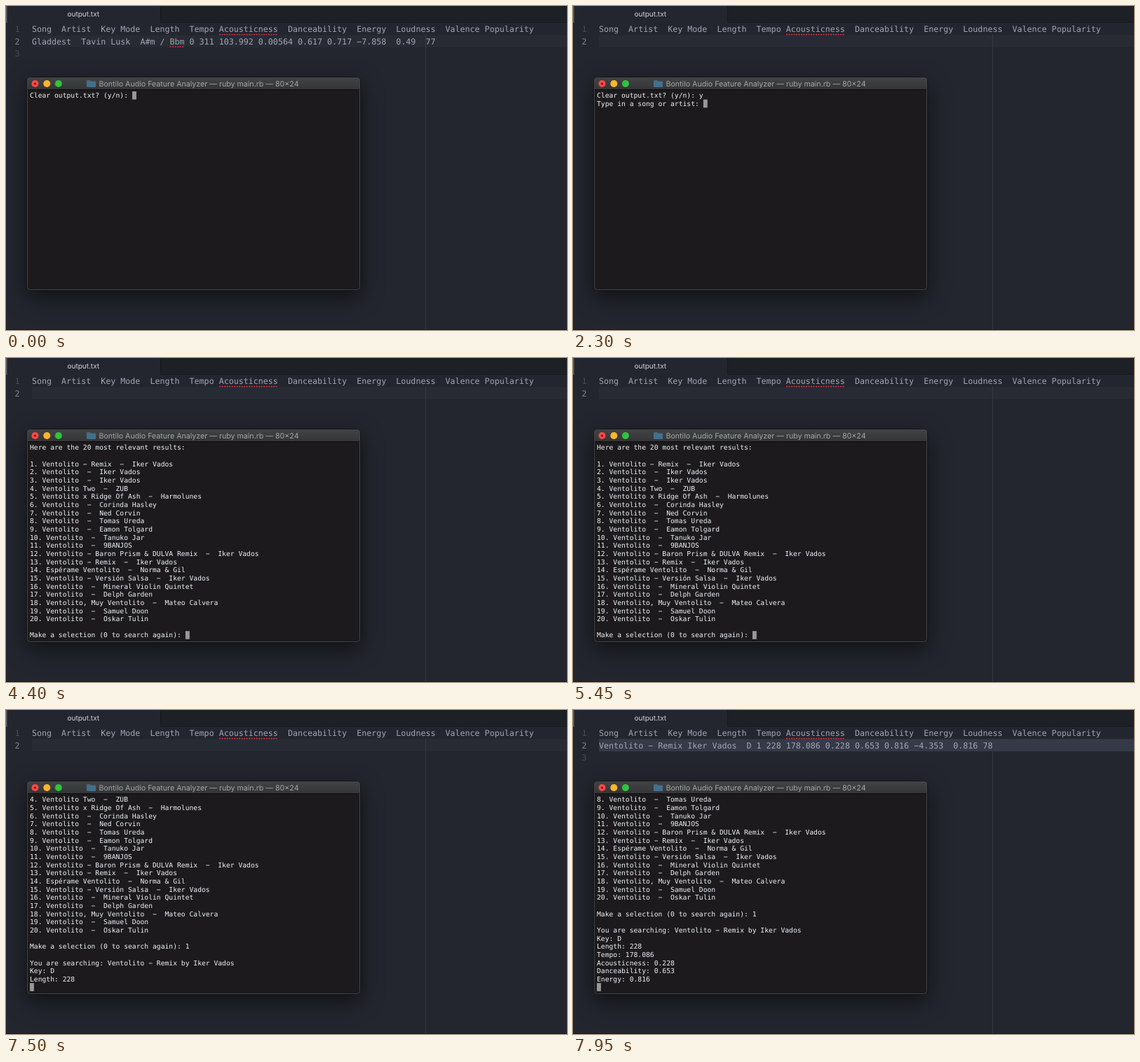
An HTML page for the animation above (8 s loop, 800 px wide and 463 px high).

```html
<!DOCTYPE html>
<html lang="en">
<head>
<meta charset="utf-8">
<title>Audio feature analyzer</title>
<style>
  html, body { margin: 0; width: 100%; height: 100%; overflow: hidden; background: #23262e; }
  svg { display: block; width: 800px; height: 463px; }
  text { white-space: pre; text-rendering: geometricPrecision; }
  .mono { font-family: "DejaVu Sans Mono", "Liberation Mono", monospace; }
  .ui { font-family: Inter, "Liberation Sans", sans-serif; text-anchor: middle; }
  .editor { font-size: 11.67px; fill: #a0a6b2; }
  .num { fill: #474c58; }
  .current { fill: #7f8590; }
  .term { font-size: 9.7px; fill: #eef3f8; }
  .spell { stroke: #c0363b; stroke-width: 1.4; stroke-dasharray: 2.2 1.3; }
  .window { filter: drop-shadow(0 10px 15px rgba(0, 0, 0, .55)); }
</style>
</head>
<body>
<svg viewBox="0 0 800 463">
  <defs>
    <linearGradient id="bar" x2="0" y2="1">
      <stop offset="0" stop-color="#424345"/>
      <stop offset="1" stop-color="#333436"/>
    </linearGradient>
  </defs>

  <!-- editor -->
  <rect width="800" height="463" fill="#23262e"/>
  <rect x="220" width="580" height="24" fill="#1d2025"/>
  <path d="M220.5 0V23.5H800M0 462.5H800" fill="none" stroke="#17191e"/>
  <rect width="1.6" height="24" fill="#555a65"/>
  <text class="ui" x="110.3" y="15.3" font-size="10" fill="#d3d6dc">output.txt</text>
  <rect id="active" x="37" y="41.5" width="763" height="17.5"/>
  <path d="M598.5 41V462" stroke="#343842"/>
  <g class="mono editor">
    <text class="num" x="12.5" y="37.2">1</text>
    <text class="current" x="12.5" y="54.7">2</text>
    <text class="num" id="third" x="12.5" y="72.2">3</text>
    <text x="37" y="37.2">Song  Artist  Key Mode  Length  Tempo Acousticness  Danceability  Energy  Loudness  Valence Popularity</text>
    <text id="record" x="37" y="54.7"></text>
  </g>
  <path class="spell" d="M304 40.7H388"/>
  <path class="spell" id="typo" d="M233.5 58.2H254.5"/>

  <!-- terminal window -->
  <rect class="window" x="29.5" y="101.5" width="476" height="305" rx="5" fill="#0b0b0c"/>
  <rect x="30" y="102" width="475" height="304" rx="4.5" fill="#1c1a1c"/>
  <path d="M30 120V106.5a4.5 4.5 0 0 1 4.5-4.5H500.5a4.5 4.5 0 0 1 4.5 4.5V120Z" fill="url(#bar)"/>
  <path d="M30 119.5H505" stroke="#0c0c0d"/>
  <rect x="30.5" y="102.5" width="474" height="303" rx="4" fill="none" stroke="#434446"/>
  <circle cx="41.5" cy="111" r="5" fill="#fb4a48"/>
  <circle cx="41.5" cy="111" r="1.5" fill="#6b0b0d"/>
  <circle cx="58.3" cy="111" r="5" fill="#fcb62c"/>
  <circle cx="74.9" cy="111" r="5" fill="#30c33d"/>
  <path d="M115 107.2q0-1 1-1h3.6l1.2 1.3H127q1 0 1 1V115q0 1-1 1H116q-1 0-1-1Z" fill="#41708f"/>
  <text class="ui" x="275" y="115" font-size="10.65" fill="#a6a7a9">Bontilo Audio Feature Analyzer — ruby main.rb — 80×24</text>
  <rect id="cursor" width="5.9" height="11.6" fill="#989898"/>
  <g id="screen" class="mono term"></g>
</svg>

<script>
  const LOOP = 8000, ROWS = 24;
  const LEFT = 34, TOP = 122, COL = 5.84, ROW = 11.66;
  const CLEARED = 1550, SAVED = 7900;

  const song = 'Ventolito', singer = 'Iker Vados';
  const results = [
    [`${song} - Remix`, singer],
    [song, singer],
    [song, singer],
    [`${song} Two`, 'ZUB'],
    [`${song} x Ridge Of Ash`, 'Harmolunes'],
    [song, 'Corinda Hasley'],
    [song, 'Ned Corvin'],
    [song, 'Tomas Ureda'],
    [song, 'Eamon Tolgard'],
    [song, 'Tanuko Jar'],
    [song, '9BANJOS'],
    [`${song} - Baron Prism & DULVA Remix`, singer],
    [`${song} - Remix`, singer],
    [`Espérame ${song}`, 'Norma & Gil'],
    [`${song} - Versión Salsa`, singer],
    [song, 'Mineral Violin Quintet'],
    [song, 'Delph Garden'],
    [`${song}, Muy ${song}`, 'Mateo Calvera'],
    [song, 'Samuel Doon'],
    [song, 'Oskar Tulin']
  ].map(([title, artist], i) => `${i + 1}. ${title}  -  ${artist}`);

  const details = [
    [7500, 'Key: D'],
    [7500, 'Length: 228'],
    [7600, 'Tempo: 178.086'],
    [7700, 'Acousticness: 0.228'],
    [7800, 'Danceability: 0.653'],
    [7900, 'Energy: 0.816']
  ];

  const before = 'Gladdest  Tavin Lusk  A#m / Bbm 0 311 103.992 0.00564 0.617 0.717 -7.858  0.49  77';
  const after = `${song} - Remix ${singer}  D 1 228 178.086 0.228 0.653 0.816 -4.353  0.816 78`;

  const $ = id => document.getElementById(id);
  const wide = s => s.replace(/-/g, '−');
  const show = (el, on) => el.setAttribute('visibility', on ? 'visible' : 'hidden');
  const setText = (el, s) => { if (el.textContent !== s) el.textContent = s; };
  const typed = (s, times, t) => s.slice(0, times.filter(k => t >= k).length);

  const rows = Array.from({ length: ROWS }, (_, i) => {
    const el = document.createElementNS('http://www.w3.org/2000/svg', 'text');
    el.setAttribute('x', LEFT);
    el.setAttribute('y', TOP + 9.3 + i * ROW);
    return $('screen').appendChild(el);
  });

  function output(t) {
    const out = ['Clear output.txt? (y/n): ' + typed('y', [750], t)];
    if (t >= 1000) {
      const keys = [2450, 2650, 2850, 3000, 3150, 3300, 3450, 3550, 3700];
      out.push('Type in a song or artist: ' + typed(song, keys, t));
    }
    if (t >= 3850) out.push('');
    if (t >= 4400) {
      out.push('Here are the 20 most relevant results:', '', ...results, '',
        'Make a selection (0 to search again): ' + typed('1', [6000], t));
    }
    if (t >= 6500) {
      out.push('', `You are searching: ${song} - Remix by ${singer}`,
        ...details.filter(([at]) => t >= at).map(d => d[1]), '');
    }
    return out.slice(-ROWS);
  }

  function draw(t) {
    const lines = output(t), last = lines.length - 1;
    rows.forEach((el, i) => setText(el, wide(lines[i] || '')));
    $('cursor').setAttribute('x', LEFT + lines[last].length * COL);
    $('cursor').setAttribute('y', TOP + last * ROW);

    const old = t < CLEARED, saved = t >= SAVED;
    setText($('record'), wide(old ? before : saved ? after : ''));
    show($('typo'), old);
    show($('third'), old || saved);
    $('active').setAttribute('fill', saved ? '#363a48' : '#282b34');
  }

  function tick(now) {
    draw(now % LOOP);
    requestAnimationFrame(tick);
  }
  draw(0);
  requestAnimationFrame(tick);
</script>
</body>
</html>
```
